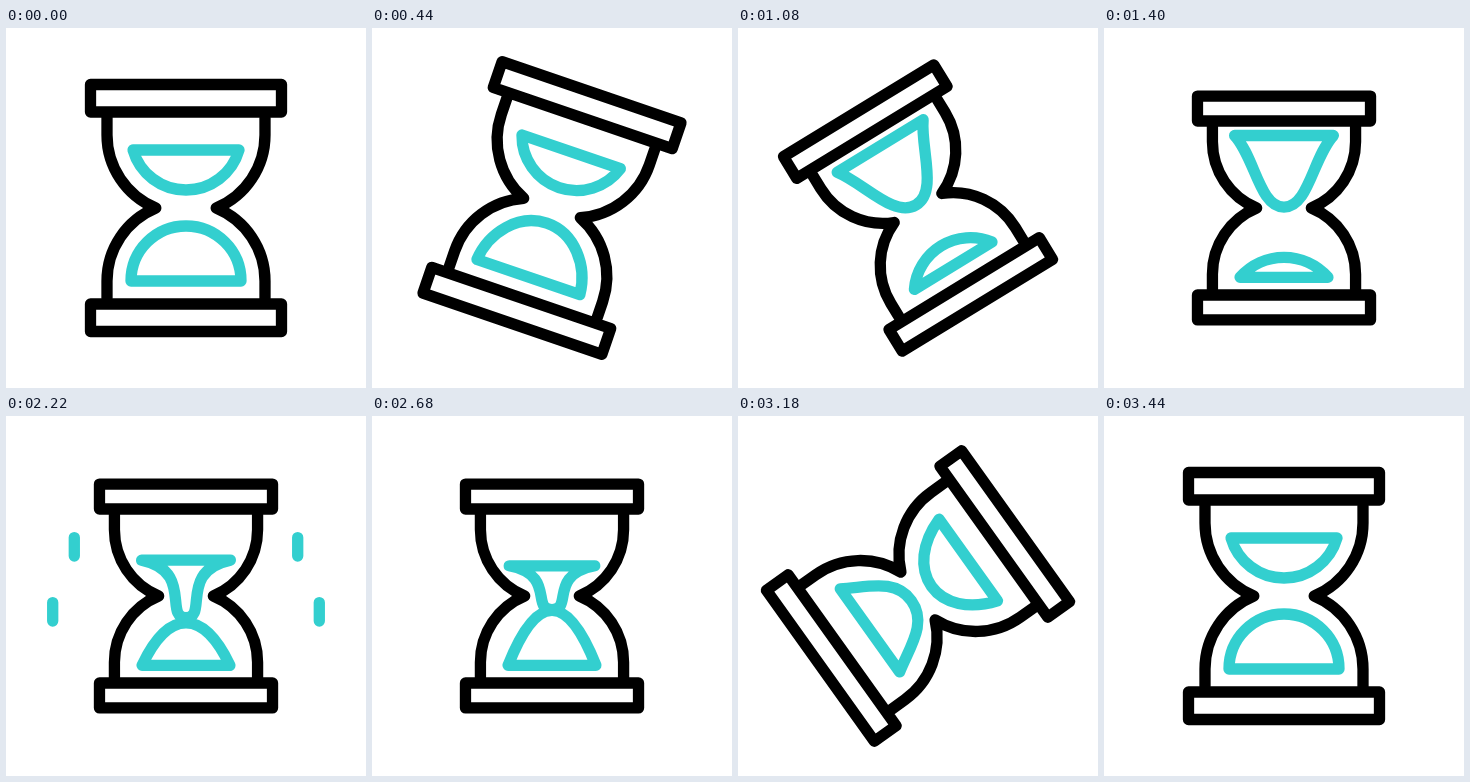
Write an HTML page that moves like this. It is 360 px wide and 360 px high and loops after 3600 ms.

```html
<!DOCTYPE html>
<html lang="en">
<head>
<meta charset="utf-8">
<title>Hourglass</title>
<style>
  html, body { margin: 0; height: 100%; overflow: hidden; background: #fff; }
  svg { display: block; width: 100%; height: 100%; fill: none; stroke: #000; stroke-width: 11.3; stroke-linecap: round; stroke-linejoin: round; }
  .teal { stroke: #33cfcf; }
</style>
</head>
<body>
<svg viewBox="-180 -180 360 360">
  <path id="dashes" class="teal"/>
  <g id="body">
    <path id="sandA" class="teal"/>
    <path id="sandB" class="teal"/>
    <!-- one wall and one cap; the other half is the same turned around -->
    <path id="half" d="M-79-90V-73A79 79 0 0 0-30.2 0A79 79 0 0 0-79 73V90M-95.5-123.5H95.5V-96H-95.5Z"/>
    <use href="#half" transform="rotate(180)"/>
  </g>
</svg>
<script>
const LOOP = 3600, STROKE = 11.3, SMALL = 0.906;
const TURN = 200, DRAIN = 1400, BACK = 2800, REST = 3400;
const el = id => document.getElementById(id);

// Half outlines of sand as one cubic: half width, base, handles, tip.
// Heights are distances from the neck; negative means past it.
function arc(w, base, tip) {
  const h = base - tip, radius = (w * w + h * h) / (2 * h);
  const angle = 2 * Math.atan(h / w);
  const k = 4 / 3 * Math.tan(angle / 4) * radius;
  return [w, base, w - k * Math.cos(angle), base - k * Math.sin(angle), k, tip];
}
const mound = (w, base, tip) => [w, base, w * 2 / 3, base - (base - tip) * 2 / 3, w / 3, tip];
const funnel = (w, base, tip, pinch) => [w, base, pinch, base * 0.7, w / 2, tip];

const restA = arc(53, 58, 18), restB = arc(55, 73, 18);
const keysA = [[TURN, restA], [DRAIN, arc(48.5, 76.5, 54.5)], [BACK, mound(48.5, 76.5, 15)], [REST, restA]];
const keysB = [
  [TURN, restB],
  [DRAIN, funnel(54.5, 80, 1, 32)],
  [2200, funnel(49, 39.6, -24, -8)],
  [BACK, funnel(47, 32.6, -14, -4)],
  [REST, restB]
];

function ease(t, start, end) {
  const x = Math.min(1, Math.max(0, (t - start) / (end - start)));
  return x * x * (3 - 2 * x);
}

function tween(keys, t) {
  let shape = keys[0][1];
  for (let i = 1; i < keys.length; i++) {
    const p = ease(t, keys[i - 1][0], keys[i][0]);
    shape = shape.map((v, k) => v + (keys[i][1][k] - v) * p);
  }
  return shape;
}

function sandPath(keys, t, side) {
  const [w, base, hx, hy, tx, tip] = tween(keys, t);
  const b = base * side, h = hy * side, e = tip * side;
  return `M${-w} ${b}L${w} ${b}C${hx} ${h} ${tx} ${e} 0 ${e}C${-tx} ${e} ${-hx} ${h} ${-w} ${b}Z`;
}

// Streaks rise on both sides, the outer pair lower.
function dashPath(t) {
  const rise = delay => 48.5 - 136 * ease(t, 1800 + delay, 2400 + delay);
  const head = rise(0), tail = rise(60);
  if (tail - head < 0.5) return "";
  const dash = (x, y) => `M${x} ${tail + y}V${head + y}`;
  return [-1, 1].map(s => dash(111.7 * s, 0) + dash(133.3 * s, 65)).join("");
}

function draw(t) {
  const flip = ease(t, TURN, DRAIN) - ease(t, BACK, REST);
  const scale = 1 + (SMALL - 1) * flip;
  el("body").setAttribute("transform", `rotate(${180 * flip}) scale(${scale})`);
  el("body").style.strokeWidth = STROKE / scale; // line weight stays constant
  el("sandA").setAttribute("d", sandPath(keysA, t, -1));
  el("sandB").setAttribute("d", sandPath(keysB, t, 1));
  el("dashes").setAttribute("d", dashPath(t));
}

const start = performance.now();
function frame() {
  draw((performance.now() - start) % LOOP);
  requestAnimationFrame(frame);
}
frame();
</script>
</body>
</html>
```
